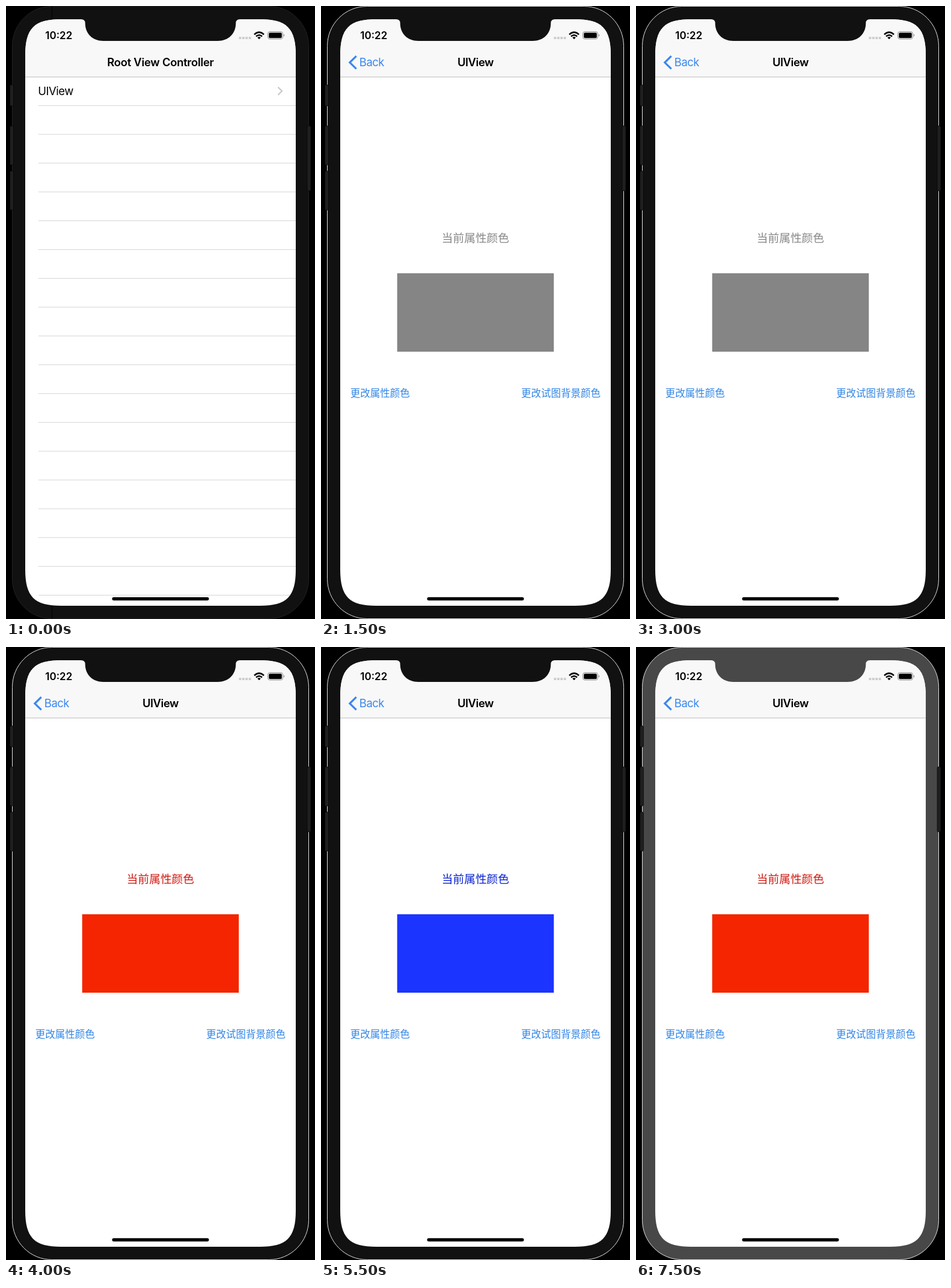
Recreate the animation shown at these times as an HTML page. Size 514 px wide and 1018 px high, loop 8000 ms.

```html
<!DOCTYPE html>
<html lang="zh">
<head>
<meta charset="utf-8">
<title>Phone demo</title>
<style>
  html, body { margin: 0; width: 100%; height: 100%; overflow: hidden; background: #000; }
  svg { display: block; width: 100%; height: 100%; }
  text { font-family: Inter, "Noto Sans CJK SC", "Noto Sans CJK", sans-serif; font-size: 18.48px; letter-spacing: -.48px; }
  .bold { font-weight: 600; }
  .title { letter-spacing: -.3px; }
  .time { font-size: 17px; letter-spacing: 0; }
  .mid { text-anchor: middle; }
  .cjk { font-family: "Noto Sans CJK SC", "Noto Sans CJK", sans-serif; font-size: 18.7px; letter-spacing: 0; }
  .link { fill: #2f84e6; font-size: 16.5px; }

  .body, .rim, .seam, .list, .pressed, .detail, .swatch, .label {
    animation: 8s step-end infinite;
  }
  .body { fill: #111; animation-name: body; }
  .rim { animation-name: rim; }
  .seam { animation-name: seam; }
  .list { animation-name: list; }
  .pressed { animation-name: pressed; }
  .detail { animation-name: detail; }
  .swatch { animation-name: swatch; }
  .label { animation-name: label; }

  @keyframes body { 0% { fill: #111; } 93.75%, 100% { fill: #484848; } }
  @keyframes rim { 0% { stroke: #222; } 6.25%, 100% { stroke: #e4e4e4; } }
  @keyframes seam { 0% { opacity: 1; } 6.25%, 100% { opacity: 0; } }
  @keyframes list { 0% { visibility: visible; } 18.75%, 100% { visibility: hidden; } }
  @keyframes pressed { 0% { visibility: hidden; } 12.5% { visibility: visible; } 18.75%, 100% { visibility: hidden; } }
  @keyframes detail { 0% { visibility: hidden; } 18.75%, 100% { visibility: visible; } }
  @keyframes swatch {
    0% { fill: #858585; }
    43.75% { fill: #f42500; }
    62.5% { fill: #1c34ff; }
    75%, 100% { fill: #f42500; }
  }
  @keyframes label {
    0% { fill: #888; }
    43.75% { fill: #d01a12; }
    62.5% { fill: #0a22d0; }
    75%, 100% { fill: #d01a12; }
  }
</style>
</head>
<body>
<svg viewBox="0 0 514 1018">
  <defs>
    <clipPath id="screen">
      <path d="M32 82c0-45 15-60 60-60H422c45 0 60 15 60 60V936c0 45-15 60-60 60H92c-45 0-60-15-60-60Z"/>
    </clipPath>
    <linearGradient id="shade">
      <stop offset="0" stop-color="#000" stop-opacity="0"/>
      <stop offset="1" stop-color="#000" stop-opacity=".15"/>
    </linearGradient>
    <pattern id="rows" x="0" y="118" width="514" height="47.83" patternUnits="userSpaceOnUse">
      <rect x="54" y="46.8" width="428" height="1" fill="#d4d4d6"/>
    </pattern>
  </defs>

  <rect width="514" height="1018"/>

  <!-- handset -->
  <rect class="body" x="10.5" y=".5" width="493" height="1017" rx="66"/>
  <rect class="rim" x="10.5" y=".5" width="493" height="1017" rx="66" fill="none"/>
  <path class="seam" d="M76.5 0V22M76.5 996V1018" stroke="#000"/>
  <g fill="#1f1f1f" stroke="#000" stroke-width=".6">
    <rect x="6.5" y="131" width="6" height="35" rx="2"/>
    <rect x="6.5" y="199" width="6" height="65" rx="2"/>
    <rect x="6.5" y="274" width="6" height="65" rx="2"/>
    <rect x="501" y="199" width="6" height="108" rx="2"/>
  </g>

  <g clip-path="url(#screen)">
    <rect x="32" y="22" width="450" height="974" fill="#fff"/>
    <rect x="32" y="22" width="450" height="96" fill="#f8f8f8"/>

    <g class="list">
      <rect x="32" y="118" width="450" height="878" fill="url(#rows)"/>
      <rect class="pressed" x="32" y="118" width="450" height="47.5" fill="#d5d5d9"/>
      <text class="bold title mid" x="257" y="100.3">Root View Controller</text>
      <text x="53.3" y="147.8">UIView</text>
      <path d="M452.5 134.8L459 141.3L452.5 147.8" fill="none" stroke="#c5c5ca" stroke-width="2"/>
      <rect class="pressed" x="472" y="118" width="10" height="878" fill="url(#shade)"/>
    </g>

    <g class="detail">
      <path d="M58.7 83.2L47.9 93.8L58.7 104.4" fill="none" stroke="#3a87f0" stroke-width="3.2"/>
      <text x="63.8" y="100.3" fill="#3a87f0">Back</text>
      <text class="bold mid" x="257" y="100.3">UIView</text>
      <text class="cjk mid label" x="256.9" y="391.5">当前属性颜色</text>
      <rect class="swatch" x="126.7" y="443.8" width="260.6" height="130.3"/>
      <text class="cjk link" x="48.8" y="649">更改属性颜色</text>
      <text class="cjk link" x="333" y="649">更改试图背景颜色</text>
    </g>

    <rect x="32" y="117.4" width="450" height="1" fill="#bcbcbc"/>

    <!-- status bar -->
    <text class="bold time" x="65.3" y="55">10:22</text>
    <path d="M387.5 53.2H408" stroke="#cbcbcb" stroke-width="3.8" stroke-dasharray="3.8 1.6"/>
    <g fill="none" stroke="#000" stroke-width="2.5">
      <path d="M413 47.3Q421 39.9 429 47.3"/>
      <path d="M416 50.5Q421 46 426 50.5"/>
    </g>
    <path d="M418.2 52.3Q421 50.2 423.8 52.3L421 55.2Z"/>
    <rect x="435.5" y="42.5" width="25" height="12.4" rx="3.6" fill="none" stroke="#8c8c8c"/>
    <rect x="437.2" y="44.2" width="21.6" height="9" rx="2"/>
    <path d="M462 46.6Q464.6 48.7 462 50.8Z" fill="#8c8c8c"/>

    <rect x="176.5" y="981.8" width="161" height="5.4" rx="2.7"/>
  </g>

  <!-- notch -->
  <path class="body" d="M125 21V22Q131.7 22 131.7 28.5C131.7 46 144 58 162 58H352C370 58 382.3 46 382.3 28.5Q382.3 22 389 22V21Z"/>
</svg>
</body>
</html>
```
